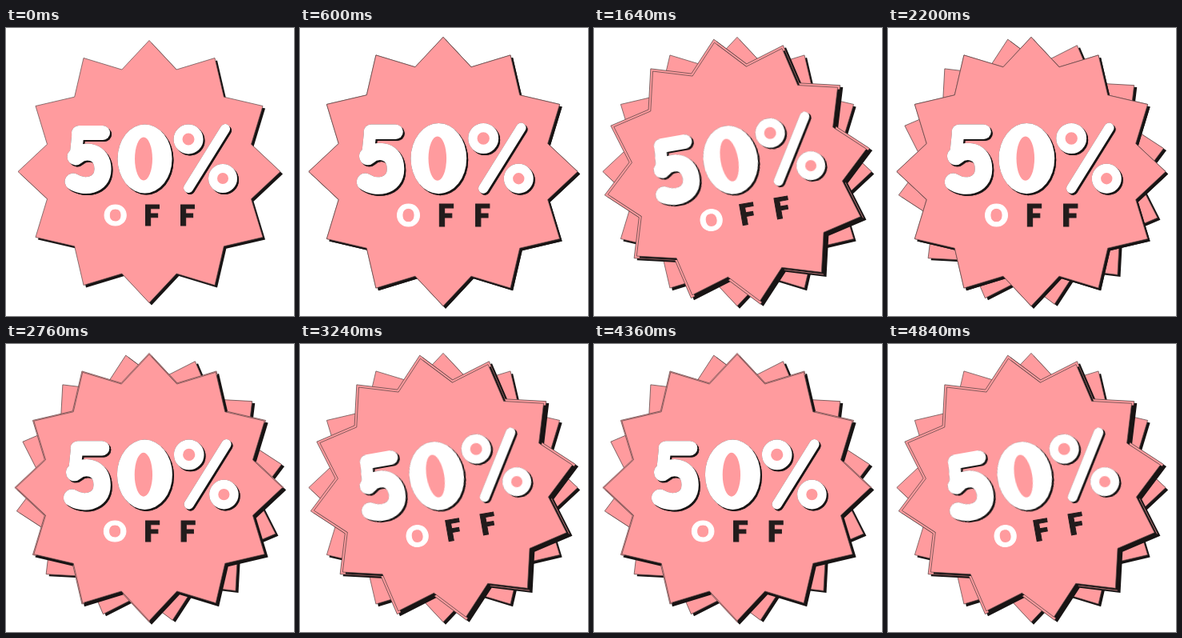
An HTML page that plays this animation: 360 px wide and 360 px high, repeating every 5 s.

```html
<!DOCTYPE html>
<html lang="en">
<head>
<meta charset="utf-8">
<title>50% off</title>
<style>
  html, body { margin: 0; width: 100%; height: 100%; overflow: hidden; background: #fff; }
  svg { display: block; width: 100vw; height: 100vh; }
  .sale { filter: drop-shadow(0 0 .5px #444) drop-shadow(2.5px 2.5px 0 #181414); }
  .off { font: 900 36px Lato, Inter, sans-serif; fill: #221c1c; stroke: #221c1c; }
  .off tspan { fill: #fff; stroke: #fff; }
</style>
</head>
<body>
<svg viewBox="0 0 360 360">
  <defs>
    <g id="star">
      <polygon class="burst" fill="#181414" transform="translate(3 3)"/>
      <polygon class="burst" fill="#ff9b9e" stroke="#5a4444" stroke-width=".7"/>
    </g>
  </defs>
  <use id="back" href="#star"/>
  <use id="backInner" href="#star"/>
  <use id="rim" href="#star"/>
  <g id="front">
    <use href="#star"/>
    <g class="sale" role="img" aria-label="50%" fill="none" stroke="#fff" stroke-linecap="round" stroke-linejoin="round">
      <path d="M91 131H121" stroke-width="18"/>
      <path d="M90 131L87 160" stroke-width="15"/>
      <path d="M87 161C99 150 121 154 121 176C121 199 96 200 84 192" stroke-width="21"/>
      <ellipse cx="173.5" cy="163.5" rx="34" ry="43" fill="#fff" stroke="none"/>
      <ellipse cx="172" cy="163.5" rx="11" ry="27" fill="#ff9b9e" stroke="none"/>
      <path d="M274 126L228 200" stroke-width="12"/>
      <g fill="#ff9b9e" stroke-width="11">
        <circle cx="228" cy="139" r="13"/>
        <circle cx="271" cy="188" r="12.5"/>
      </g>
    </g>
    <text class="off" x="122 172 216" y="246.5"><tspan>O</tspan>FF</text>
  </g>
</svg>
<script>
  const LOOP = 5000, BEAT = 400, FIRST = 200, BIG = 1.025, TILT = -10;
  const [back, backInner, rim, front] =
    ["back", "backInner", "rim", "front"].map(id => document.getElementById(id));

  // Twelve-pointed badge, alternating outer and inner radius
  const points = Array.from({ length: 24 }, (_, i) => {
    const a = i * Math.PI / 12, r = i % 2 ? 132 : 164;
    return [179 + r * Math.sin(a), 179.5 - r * Math.cos(a)].map(v => v.toFixed(2));
  }).join(" ");
  document.querySelectorAll(".burst").forEach(p => p.setAttribute("points", points));

  const place = (el, angle, scale) => el.setAttribute("transform",
    `translate(180 180) rotate(${angle}) scale(${scale}) translate(-180 -180)`);
  const show = (el, on) => el.setAttribute("visibility", on ? "visible" : "hidden");

  // Each beat swells at once, then settles
  const swell = p => p < 160 ? BIG : p < 200 ? 1.015 : p < 240 ? 1.007 : 1;

  function draw(t) {
    const beat = Math.floor((t - FIRST) / BEAT);
    const p = t - FIRST - beat * BEAT;
    // Every seventh beat swaps the pose only after settling
    const lateBeat = beat % 7 === 1;
    const swaps = beat + (p >= (lateBeat ? 280 : 40));
    const late = lateBeat ? p >= 280 : beat % 7 === 2 && p < 40;
    const angle = swaps > 0 && swaps % 2 === 0 ? TILT : 0;

    place(back, TILT - angle, BIG);
    place(backInner, TILT - angle, 1);
    place(rim, angle, BIG);
    place(front, angle, beat < 0 ? 1 : swell(p));
    show(back, swaps > 1);
    show(backInner, late);
    show(rim, beat >= 0 && !late);
  }

  const start = performance.now();
  function tick() {
    draw((performance.now() - start) % LOOP);
    requestAnimationFrame(tick);
  }
  tick();
</script>
</body>
</html>
```
